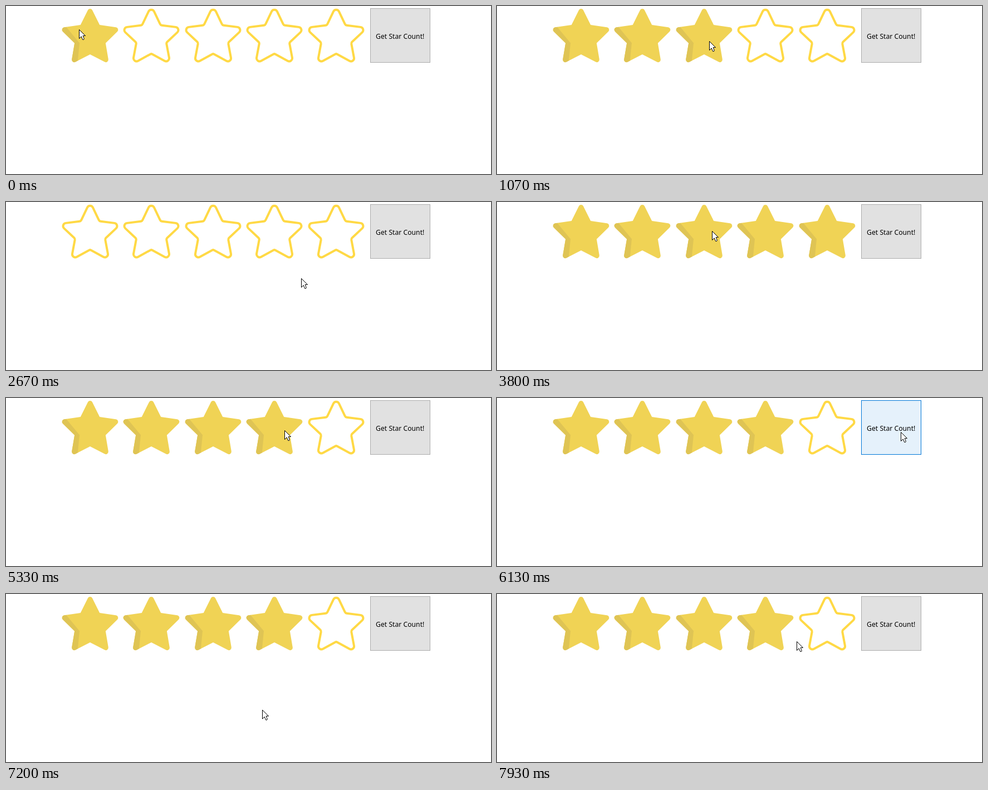
Animation of 871x302 px, one loop 8000 ms. Source, as an HTML page:

```html
<!DOCTYPE html>
<html lang="en">
<head>
<meta charset="utf-8">
<title>Star rating</title>
<style>
  html, body { margin: 0; width: 100%; height: 100%; overflow: hidden; background: #fff; }
  svg { display: block; }
  text { font: 12.2px "Noto Sans", "Open Sans", sans-serif; text-anchor: middle; }
  .line { fill: none; stroke: #ffd945; stroke-width: 4; }
  .button { fill: #e1e1e1; stroke: #adadad; }
  .focus { stroke: #0078d7; }
  .hover { fill: #e5f1fb; stroke: #0078d7; }
  .pressed { fill: #cce4f7; stroke: #005499; }
</style>
</head>
<body>
<svg width="871" height="302" viewBox="0 0 871 302">
  <defs>
    <path id="outline" class="line"/>
    <clipPath id="body"><path id="shape"/></clipPath>
    <g id="full" clip-path="url(#body)" transform="translate(0 .3)">
      <path fill="#f0d355" d="M-60-60H60V60H-60Z"/>
      <path fill="#dfc454" d="M-60-20H-43L-19 9L-24 60H-60Z"/>
    </g>
  </defs>
  <g id="stars"></g>
  <rect id="count" x="654.5" y="4.5" width="107" height="97"/>
  <text x="707.7" y="59">Get Star Count!</text>
  <g id="dialog">
    <rect width="871" height="302" fill="#333" opacity=".54"/>
    <rect x="312.5" y="157.5" width="239" height="143" fill="#fff" stroke="#555"/>
    <path fill="#f0f0f0" d="M313 244H551V300H313Z"/>
    <path stroke="#dfdfdf" d="M313 244.5H551"/>
    <text x="432.3" y="205">4</text>
    <rect id="ok" x="451.5" y="259.5" width="73" height="22"/>
    <text x="487.5" y="274">OK</text>
  </g>
  <path id="cursor" fill="#fff" stroke="#000" stroke-linejoin="round"
    d="M.5 .5V16.5L4.2 12.8L6.7 18.5H8.5L9.3 17L7.2 11.5H11.5Z"/>
</svg>
<script>
const $ = id => document.getElementById(id);
const LOOP = 8000, PITCH = 110.4;

// Five-pointed star with rounded tips and notches
function starPath(outer, inner, tipRadius, notchRadius) {
  const points = Array.from({ length: 10 }, (_, i) => {
    const r = i % 2 ? inner : outer, a = i * Math.PI / 5;
    return [r * Math.sin(a), -r * Math.cos(a)];
  });
  const toward = (p, q, d) => {
    const k = d / Math.hypot(q[0] - p[0], q[1] - p[1]);
    return [p[0] + (q[0] - p[0]) * k, p[1] + (q[1] - p[1]) * k];
  };
  const parts = points.map((p, i) => {
    const r = i % 2 ? notchRadius : tipRadius;
    const before = points[(i + 9) % 10], after = points[(i + 1) % 10];
    const a = toward(p, before, 1), b = toward(p, after, 1);
    const half = Math.asin(Math.hypot(a[0] - b[0], a[1] - b[1]) / 2);
    const d = r / Math.tan(half);
    return `${toward(p, before, d)}A${r} ${r} 0 0 ${i % 2 ? 0 : 1} ${toward(p, after, d)}`;
  });
  return "M" + parts.join("L") + "Z";
}

$("outline").setAttribute("d", starPath(58, 28.3, 5.5, 4));
$("shape").setAttribute("d", starPath(58.3, 29.3, 4.5, 0));

const stars = Array.from({ length: 5 }, (_, i) => {
  const use = document.createElementNS("http://www.w3.org/2000/svg", "use");
  use.setAttribute("transform", `translate(${Math.round(151 + i * PITCH)} 57.3)`);
  return $("stars").appendChild(use);
});

// Pointer stops: arrival time, x, y and, if unusual, travel time
const stops = [
  [0, 131, 42], [470, 257, 62, 470], [800, 350, 60], [1270, 470, 70],
  [1600, 480, 163], [1870, 490, 123], [2000, 485, 75], [2470, 510, 164],
  [2870, 589, 58], [3270, 524, 187], [3530, 435, 152], [3800, 386, 52],
  [4330, 330, 132], [4600, 257, 124], [5130, 500, 58], [5730, 560, 139],
  [5930, 700, 90], [6130, 725, 61], [6530, 531, 236], [6730, 483, 276, 60],
  [7800, 390, 4, 800], [7930, 538, 85, 60]
];
const clicks = [2950, 4040, 5300];
const dialogOpen = 6270, okDown = 7000, dialogClose = 7070;

function pointerAt(t) {
  let [prev, x, y] = stops[0];
  for (const [arrive, nextX, nextY, travel = 270] of stops.slice(1)) {
    const from = Math.max(prev, arrive - travel);
    if (t <= from) break;
    const k = Math.min(1, (t - from) / (arrive - from));
    x += (nextX - x) * k;
    y += (nextY - y) * k;
    if (k < 1) break;
    prev = arrive;
  }
  return [Math.round(x), Math.round(y)];
}

// Number of the star under the pointer, 0 if none
function starAt(t) {
  const [x, y] = pointerAt(t), n = Math.floor((x - 98) / PITCH) + 1;
  return y < 102 && n <= 5 ? n : 0;
}

function isOver(id, [x, y]) {
  const b = $(id).getBBox();
  return x >= b.x && x < b.x + b.width && y >= b.y && y < b.y + b.height;
}

function draw(now) {
  // The screen updates 15 times a second
  const tick = Math.floor((now % LOOP + 3.4) * 0.015) % 120;
  const t = Math.round(tick * 20 / 3) * 10;
  const pointer = pointerAt(t);
  const open = t >= dialogOpen && t < dialogClose;

  const rating = clicks.reduce((last, click) => t >= click ? starAt(click) : last, 0);
  const lit = Math.max(rating, open ? 0 : starAt(t));
  stars.forEach((star, i) => star.setAttribute("href", i < lit ? "#full" : "#outline"));

  $("dialog").style.display = open ? "" : "none";
  $("count").setAttribute("class", open || isOver("count", pointer) ? "hover" : "button");
  const okState = t >= okDown ? "pressed" : isOver("ok", pointer) ? "hover" : "button focus";
  $("ok").setAttribute("class", okState);
  $("cursor").setAttribute("transform", `translate(${pointer})`);
}

const start = performance.now();
function frame() {
  draw(performance.now() - start);
  requestAnimationFrame(frame);
}
frame();
</script>
</body>
</html>
```
